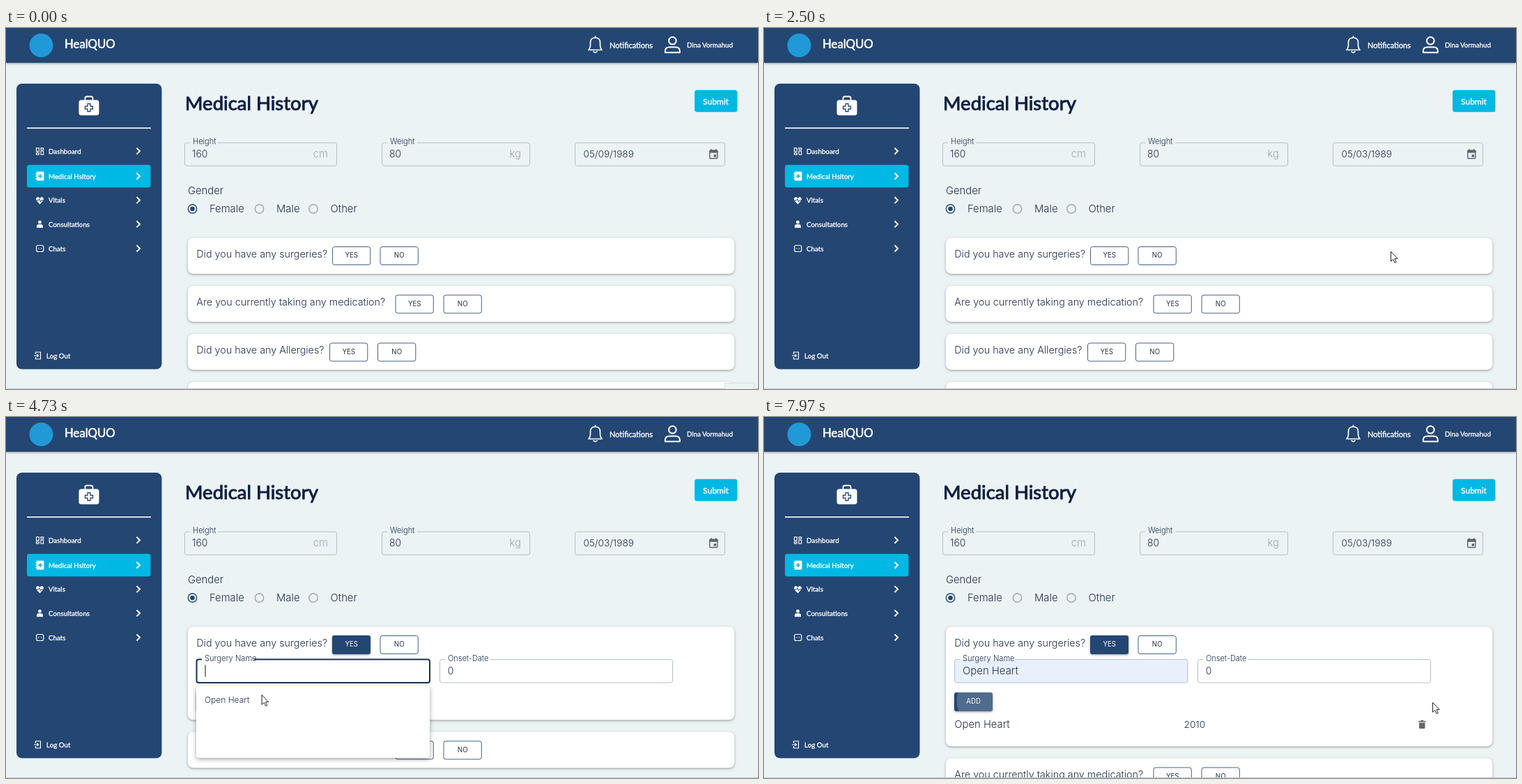
An HTML page that plays this animation: 1079 px wide and 519 px high, repeating every 8000 ms.

```html
<!DOCTYPE html>
<html lang="en">
<head>
<meta charset="utf-8">
<title>Medical History</title>
<style>
  html, body { margin: 0; width: 100%; height: 100%; overflow: hidden; background: #ebf3f5; }
  svg { display: block; width: 100vw; height: 100vh; }
  text { font-family: Inter, "Open Sans", sans-serif; font-weight: 350; white-space: pre; }
  .lato { font-family: Lato, "Open Sans", sans-serif; font-weight: 400; }
  .small { font-weight: 400; }
  .card { filter: drop-shadow(0 1px 1px rgba(0, 0, 0, .28)) drop-shadow(0 1px 2px rgba(0, 0, 0, .14)); }
  .popover { filter: drop-shadow(0 2px 3px rgba(0, 0, 0, .36)); }
</style>
</head>
<body>
<svg id="stage" viewBox="0 0 1079 519"></svg>
<script>
const DURATION = 8000;
const NAVY = '#244672', CYAN = '#00b8e4', INK = '#22304b', DEEP = '#17305a';
const PAGE = '#ebf3f5', EDGE = '#b5c0c6', GRAY = '#9ba6ac';
const stage = document.getElementById('stage');

// ---- drawing helpers ----
function el(parent, tag, attrs = {}) {
  const node = document.createElementNS('http://www.w3.org/2000/svg', tag);
  for (const key in attrs) node.setAttribute(key, attrs[key]);
  return parent.appendChild(node);
}
const group = (parent, attrs) => el(parent, 'g', attrs);
const rect = (parent, x, y, width, height, rx, attrs) =>
  el(parent, 'rect', { x, y, width, height, rx, ...attrs });
const circle = (parent, cx, cy, r, attrs) => el(parent, 'circle', { cx, cy, r, ...attrs });
const line = (parent, d, stroke, width = 1.5, attrs) =>
  el(parent, 'path', { d, fill: 'none', stroke, 'stroke-width': width, ...attrs });
const shape = (parent, d, fill) => el(parent, 'path', { d, fill });

function text(parent, x, y, content, size = 14.3, fill = INK, attrs) {
  const node = el(parent, 'text', { x, y, 'font-size': size, fill, ...attrs });
  node.textContent = content;
  return node;
}
// Regular Lato thickened by an outline
const heavy = (parent, x, y, content, size, fill = '#fff', attrs) =>
  text(parent, x, y, content, size, fill,
    { class: 'lato', stroke: fill, 'stroke-width': size / 30, ...attrs });
const MIDDLE = { 'text-anchor': 'middle' };
const CAPTION = { ...MIDDLE, class: 'small' };

// Rounded border, open along the top between gapStart and gapEnd
function border(parent, x, y, w, h, gapStart, gapEnd, stroke = EDGE, width = 1) {
  const from = gapEnd || x + 3, to = gapStart || x + 3;
  return line(parent, `M${from} ${y}H${x + w - 3}q3 0 3 3V${y + h - 3}q0 3-3 3H${x + 3}q-3 0-3-3V${y + 3}q0-3 3-3H${to}`, stroke, width);
}

// ---- motion helpers ----
function track(node, steps, easing = 'linear') {
  const padded = [[0, steps[0][1]], ...steps, [DURATION, steps[steps.length - 1][1]]];
  node.animate(padded.map(([time, props]) => ({ offset: time / DURATION, easing, ...props })),
    { duration: DURATION, iterations: Infinity });
  return node;
}
const fade = (node, ...steps) => track(node, steps.map(([t, opacity]) => [t, { opacity }]));
// Alternating on and off times
function show(node, ...times) {
  const steps = times.map((t, i) => [t, { opacity: i % 2 ? 0 : 1 }]);
  if (times[0] > 0) steps.unshift([0, { opacity: 0 }]);
  return track(node, steps, 'steps(1, end)');
}

// ---- header ----
rect(stage, 0, 0, 1079, 519, 0, { fill: PAGE });
const header = group(stage);
rect(header, 0, 0, 1079, 50, 0, { fill: NAVY, class: 'card' });
circle(header, 50.5, 25, 17, { fill: '#2199d6' });
heavy(header, 84, 29, 'HealQUO', 16.8);
line(header, 'M836 31.5h19q-2.5-3-2.5-6.5v-4q0-7-7-7t-7 7v4q0 3.5-2.5 6.5zM845.5 14v-2M843 34q2.5 2.5 5 0', '#fff', 1.7, { 'stroke-linejoin': 'round', 'stroke-linecap': 'round' });
heavy(header, 866, 28.5, 'Notifications', 11);
circle(header, 956.3, 18.2, 5.3, { fill: 'none', stroke: '#fff', 'stroke-width': 2 });
line(header, 'M945.8 35.2v-2q0-5.7 6-5.7h9q6 0 6 5.7v2z', '#fff', 2, { 'stroke-linejoin': 'round' });
heavy(header, 977, 28, 'Dina Vormahud', 9.7);

// ---- sidebar ----
const side = group(stage);
rect(side, 15, 80, 208.5, 410.5, 8, { fill: NAVY });
rect(side, 104.5, 103.5, 29, 22, 3.5, { fill: '#fff' });
line(side, 'M113.5 104v-3q0-2.5 2.5-2.5h6q2.5 0 2.5 2.5v3', '#fff', 1.8);
line(side, 'M117 109h4v3.5h3.5v4H121v3.5h-4v-3.5h-3.5v-4h3.5z', NAVY, 1.3);
rect(side, 30, 143, 178, 1.6, 0, { fill: '#fff' });
rect(side, 30, 196.7, 177.5, 32.5, 3.5, { fill: CYAN });

const menu = [['Dashboard', 177], ['Medical Hsitory', 213], ['Vitals', 247.5], ['Consultations', 282], ['Chats', 317]];
for (const [label, y] of menu) {
  heavy(side, 61, y + 3.7, label, 9.8);
  line(side, `M187.5 ${y - 4.5}l4.5 4.5l-4.5 4.5`, '#fff', 2);
}
for (const [x, y, h] of [[43.5, 172.5, 5], [43.5, 179.5, 2.5], [50, 172.5, 2.5], [50, 177, 5]])
  rect(side, x, y, 3.7, h, 0, { fill: 'none', stroke: '#fff', 'stroke-width': 1.1 });
rect(side, 43.5, 206.5, 11, 13, 1.5, { fill: '#fff' });
line(side, 'M46 213h6M49 210v6', CYAN, 1.6);
line(side, 'M42.3 209.5h2M42.3 213h2M42.3 216.5h2', '#fff', 1);
shape(side, 'M48.5 253.5L43.5 248q-1.5-4 2-5q2 0 3 2q1-2 3-2q3.5 1 2 5z', '#fff');
line(side, 'M42 247.8h4.5l1.5-2l1.5 4l1.3-2H55', NAVY, 1);
circle(side, 48.5, 279.2, 2.4, { fill: '#fff' });
shape(side, 'M44 287.3v-2q0-3 3-3h3q3 0 3 3v2z', '#fff');
rect(side, 43.7, 312.5, 10, 9, 2, { fill: 'none', stroke: '#fff', 'stroke-width': 1.2 });
line(side, 'M46.5 317h1M50 317h1', '#fff', 1.3);
line(side, 'M42.5 469v-3h7v10h-7v-3M40 471h6.5M44.5 469l2 2l-2 2', '#fff', 1.2);
heavy(side, 58, 474.6, 'Log Out', 9.8);

// ---- form ----
const form = group(stage);
heavy(form, 257, 118.3, 'Medical History', 27.5, '#0d1f42');
rect(form, 988, 89.2, 61.3, 31.6, 3.5, { fill: CYAN });
heavy(form, 1018.5, 109.6, 'Submit', 12, '#fff', MIDDLE);

function labelled(x, w, label, gapEnd, value, unit) {
  border(form, x + .5, 165, w, 33.2, x + 8, gapEnd);
  text(form, x + 12, 167, label, 11);
  text(form, x + 11, 186.4, value, 13.8);
  text(form, x + w - 12, 186.4, unit, 14.8, GRAY, { 'text-anchor': 'end' });
}
labelled(256, 218, 'Height', 304, '160', 'cm');
labelled(539, 212, 'Weight', 590, '80', 'kg');

const birthBox = [816.5, 165, 215, 33.2], PICK_DAY = 2050;
border(form, ...birthBox);
show(border(form, ...birthBox, 0, 0, INK), 670, 1120);
show(text(form, 828.5, 186.4, '05/09/1989', 13.6), 0, PICK_DAY);
show(text(form, 828.5, 186.4, '05/03/1989', 13.6), PICK_DAY, DURATION);
rect(form, 1009.7, 176, 11, 11.5, 1, { fill: 'none', stroke: '#5d656d', 'stroke-width': 1.4 });
shape(form, 'M1009 176h12.5v3.5H1009zM1011 174h1.5v3H1011zM1018 174h1.5v3H1018zM1015.5 182h3.5v3.5h-3.5z', '#5d656d');

text(form, 261, 238.5, 'Gender', 14.8);
for (const [x, label, labelX] of [[267.5, 'Female', 292], [363.5, 'Male', 388], [441, 'Other', 465.5]]) {
  const on = label === 'Female';
  circle(form, x, 260, 6.2, { fill: 'none', stroke: on ? NAVY : GRAY, 'stroke-width': 1.4 });
  if (on) circle(form, x, 260, 3.3, { fill: NAVY });
  text(form, labelX, 264.8, label, 14.8);
}

// ---- question cards ----
function outlined(parent, x, y, label) {
  const frame = rect(parent, x + .5, y + .5, 54.3, 26, 3, { fill: '#fff', stroke: NAVY, 'stroke-opacity': .85 });
  text(parent, x + 27.7, y + 16.4, label, 9.7, INK, CAPTION);
  return frame;
}
function contained(parent, x, y, label) {
  const button = group(parent);
  rect(button, x, y, 55, 27, 3, { fill: NAVY, class: 'card' });
  text(button, x + 27.7, y + 16.4, label, 9.7, '#fff', CAPTION);
  return button;
}
const card = (parent, y) => rect(parent, 260.7, y, 784.6, 52, 8, { fill: '#fff', class: 'card' });

const lower = group(stage);
const lowerCards = [[370.5, 'Are you currently taking any medication?', 558.5], [439.5, 'Did you have any Allergies?', 464], [508.5]];
for (const [y, question, x] of lowerCards) {
  card(lower, y);
  if (!question) continue;
  text(lower, 273.3, y + 28.6, question);
  outlined(lower, x, y + 13, 'YES');
  outlined(lower, x + 69, y + 13, 'NO');
}
const EXPAND = 3980, ADDED = 7600;
const shift = y => ({ transform: `translateY(${y}px)` });
track(lower, [[0, shift(0)], [EXPAND, shift(82)], [ADDED, shift(120)]], 'steps(1, end)');

const first = group(stage);
track(card(first, 301.5),
  [[0, { height: '52px' }], [EXPAND, { height: '134px' }], [ADDED, { height: '172px' }]], 'steps(1, end)');
text(first, 273.3, 330.1, 'Did you have any surgeries?');
show(outlined(first, 468, 314, 'YES'), 0, EXPAND);
outlined(first, 536.5, 314, 'NO');
fade(contained(first, 468, 314, 'YES'), [EXPAND, 0], [4200, 1]);
fade(contained(first, 537, 314, 'NO'), [3290, 0], [3480, 1], [EXPAND, 1], [4200, 0]);

// ---- surgery details ----
const FOCUS_NAME = 4420, PREVIEW = 4800, PICK_NAME = 5050, FOCUS_DATE = 5700;
const details = show(group(first), EXPAND, DURATION);
const nameBox = [273.5, 348.5, 334.5, 33.5], dateBox = [622.5, 348.5, 334, 33.5];
show(rect(details, ...nameBox, 3, { fill: '#e8f0fe' }), PREVIEW, DURATION);
show(border(details, ...nameBox), 0, FOCUS_NAME);
show(border(details, ...nameBox, 281, 356, DEEP, 2), FOCUS_NAME, FOCUS_DATE);
show(border(details, ...nameBox, 281, 361), FOCUS_DATE, DURATION);
const nameLabel = text(details, 0, 0, 'Surgery Name', 14.8);
const place = (y, scale) => ({ transform: `translate(285px, ${y}px) scale(${scale})` });
track(nameLabel, [[FOCUS_NAME, place(370.5, 1)], [FOCUS_NAME + 180, place(351.3, .75)]], 'ease-out');
show(text(details, 285, 370.3, 'Open Heart', 14.9), PREVIEW, DURATION);
const caret = x => rect(details, x, 356.5, 1, 17, 0, { fill: '#111' });
show(caret(285.5), FOCUS_NAME, PREVIEW);
show(caret(365.7), PICK_NAME, 5580);

show(border(details, ...dateBox, 630, 694), 0, FOCUS_DATE, ADDED, DURATION);
show(border(details, ...dateBox, 630, 692, DEEP, 2), FOCUS_DATE, ADDED);
text(details, 634, 351.3, 'Onset-Date', 11);
show(text(details, 633.8, 370.3, '0', 13.8), 0, 5940, ADDED, DURATION);
const typed = [[5940, '2', 643], [6360, '20', 651.5], [6450, '201', 657], [6550, '2010', 664.5]];
typed.forEach(([time, value, caretX], i) => {
  const next = typed[i + 1];
  show(text(details, 633.8, 370.3, value, 13.6), time, next ? next[0] : ADDED);
  show(caret(caretX), time, next ? next[0] : 7080);
});

contained(details, 273, 396, 'ADD');
const clip = el(details, 'clipPath', { id: 'addShape' });
rect(clip, 273, 396, 55, 27, 3);
const ripple = circle(group(details, { 'clip-path': 'url(#addShape)' }), 315, 408, 0, { fill: '#fff', opacity: .2 });
track(ripple, [[ADDED, { r: '0px' }], [7970, { r: '38.5px' }]], 'ease-out');

const entry = show(group(details), ADDED, DURATION);
text(entry, 273.3, 447.2, 'Open Heart', 14.8);
text(entry, 602.5, 447.2, '2010', 13.7);
shape(entry, 'M939 437h3l1-1.2h2.5l1 1.2h3v1.5H939zM940 439.5h8.5v7q0 1.5-1.5 1.5h-5.5q-1.5 0-1.5-1.5z', '#666');

const suggestions = show(group(stage), 4480, PICK_NAME);
rect(suggestions, 273, 386, 335, 104, 4, { fill: '#fff', class: 'popover' });
show(rect(suggestions, 273, 393, 335, 27, 0, { fill: '#eceef1' }), PREVIEW, PICK_NAME);
text(suggestions, 285, 411, 'Open Heart', 12);

// ---- calendar ----
const calendar = group(stage, { style: 'transform-origin: 895px 199px' });
rect(calendar, 757.5, 198.5, 274.5, 286.5, 3, { fill: '#fff', class: 'popover' });
text(calendar, 778, 230, 'May 1989', 13.4);
shape(calendar, 'M852.5 223.2h8l-4 4z', '#555');
line(calendar, 'M979 221l-4 4l4 4M1005 221l4 4l-4 4', '#555', 1.5);
const columnX = i => 791.7 + i * 34.35;
[...'SMTWTFS'].forEach((letter, i) => text(calendar, columnX(i), 264.2, letter, 8.3, GRAY, MIDDLE));
const dayX = day => columnX(day % 7), dayY = day => 295.5 + Math.floor(day / 7) * 32.6;
const dayText = (parent, day, fill) => text(parent, dayX(day), dayY(day) + 3, day, 8.4, fill, MIDDLE);
show(circle(calendar, dayX(3), dayY(3), 15.4, { fill: '#f3f4f6' }), 1620, PICK_DAY);
for (let day = 1; day <= 31; day++) dayText(calendar, day, '#3c4350');
for (const [day, on, off] of [[9, 0, PICK_DAY], [3, PICK_DAY, DURATION]]) {
  const chosen = show(group(calendar), on, off);
  circle(chosen, dayX(day), dayY(day), 15.4, { fill: '#162f54' });
  dayText(chosen, day, '#fff');
}
const closed = { opacity: 0, transform: 'scale(.75, .56)' }, open = { opacity: 1, transform: 'scale(1, 1)' };
track(calendar, [[930, closed], [1160, open], [2100, open], [2320, closed]], 'ease-out');

rect(stage, 0, 518, 1079, 1, 0, { fill: '#c6ced1' });
show(rect(stage, 1031.5, 510.5, 42, 10, 0, { fill: '#eef4f4', stroke: '#d5dfe0' }), 0, 70);

// ---- pointer ----
const pointer = group(stage, { stroke: '#222', 'stroke-width': 1, 'stroke-linejoin': 'round', fill: '#fff' });
const arrow = el(pointer, 'path', { d: 'M.5 .5V14.5L3.8 11.5L6 16.5L8.2 15.5L6 10.7H10.2Z' });
const hand = el(pointer, 'path', { d: 'M-1.5 10V1.5a1.5 1.5 0 0 1 3 0V6.5q1.3-1 2.4.3q1.3-.7 2.3.5q1.6-.4 1.9 1.2V13q0 2-1.2 3.5V18H0V16.5L-4 11.5q-.6-1.6 1-1.8Z' });
const beam = line(pointer, 'M-3.5-7H-.7L0-6.3L.7-7H3.5M-3.5 7H-.7L0 6.3L.7 7H3.5M0-6.3V6.3', '#222', 1.3);
show(arrow, 70, 720, 1150, 1600, 2300, 3050, 3520, 3700, 4180, 4280, 4600, 5200, 7260, 7450, 7700, DURATION);
show(hand, 720, 1150, 1600, 2300, 3050, 3520, 3700, 4180, 7450, 7700);
show(beam, 4280, 4600, 5200, 7260);
const path = [
  [70, 1030, 493], [720, 1014, 178], [1050, 1014, 178], [1680, 896, 307], [2300, 896, 307],
  [2480, 899, 321], [2510, 899, 321], [2620, 720, 358], [2760, 527, 329], [3000, 527, 329],
  [3100, 547, 328], [3480, 547, 328], [3850, 500, 325], [4080, 500, 325], [4350, 420, 366],
  [4500, 420, 366], [4800, 360, 403], [5060, 360, 403], [5440, 712, 377], [5540, 712, 377],
  [5700, 700, 371], [7200, 700, 371], [7360, 329, 402], [7390, 329, 402], [7500, 315, 408],
  [7640, 315, 408], [7960, 959, 410],
];
track(pointer, path.map(([t, x, y]) => [t, { transform: `translate(${x}px, ${y}px)` }]), 'ease-in-out');
</script>
</body>
</html>
```
